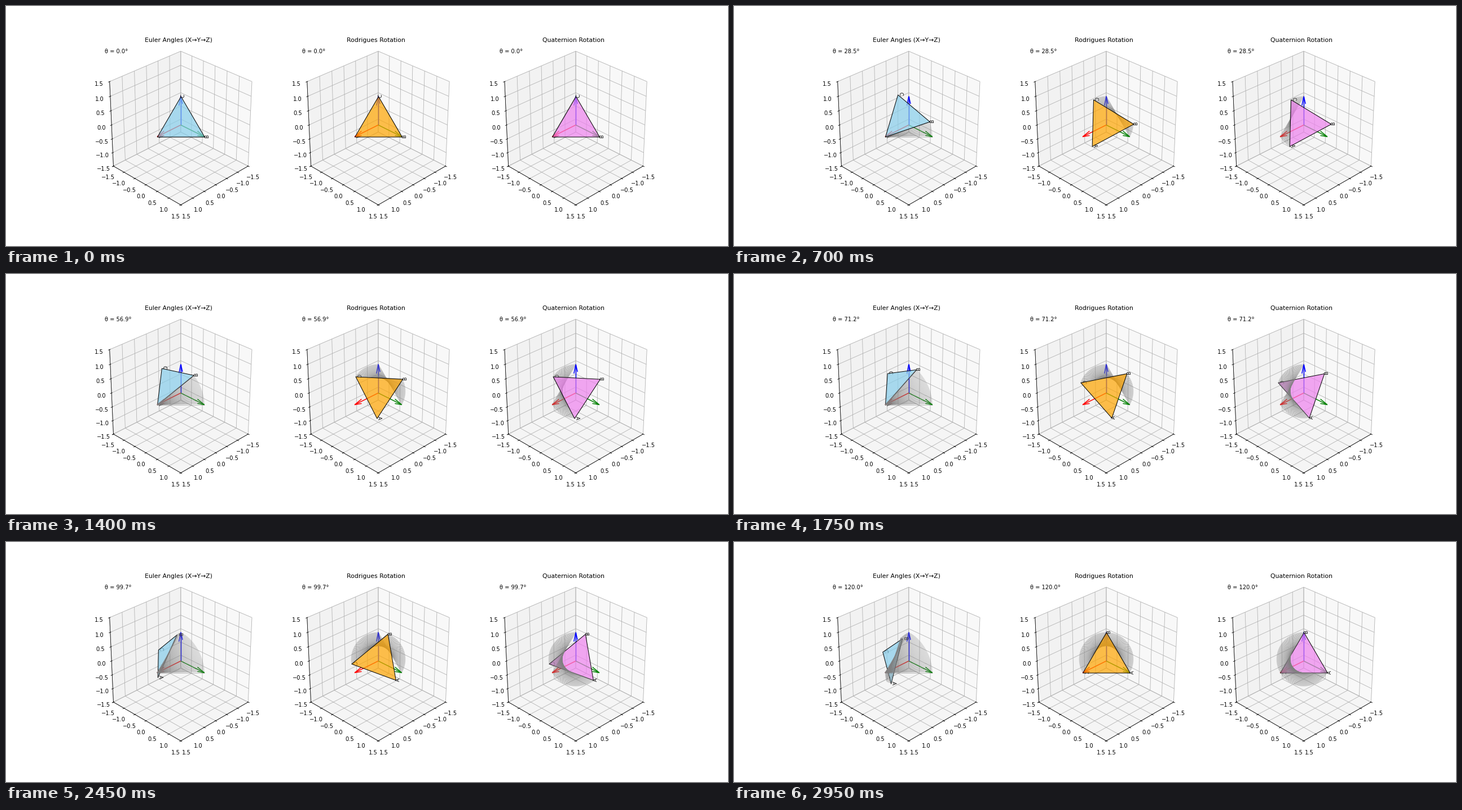
Recreate the animation shown at these times as a matplotlib script. Size 1280 px wide and 427 px high, loop 3000 ms.

```python
import numpy as np
import matplotlib.pyplot as plt
from matplotlib.animation import FuncAnimation
from mpl_toolkits.mplot3d.art3d import Line3DCollection, Poly3DCollection

plt.rcParams["font.family"] = "DejaVu Sans"

FRAMES, INTERVAL = 60, 50
ANGLES = np.linspace(0, 120, FRAMES)
TRIANGLE = np.eye(3)  # rows are the vertices A, B, C
DPI = 1280 / 18
# Shrinking coplanar parts slightly keeps the depth order arrows < trail < face.
ARROW_SCALE, TRAIL_SCALE = 0.9998, 0.9999


def axis_rotation(axis, degrees):
    """Rotation matrix about an axis by Rodrigues' formula."""
    x, y, z = np.asarray(axis, float) / np.linalg.norm(axis)
    k = np.array([[0, -z, y], [z, 0, -x], [-y, x, 0]])
    a = np.radians(degrees)
    return np.eye(3) + np.sin(a) * k + (1 - np.cos(a)) * k @ k


def euler_rotation(theta):
    """Turn about X up to 90 degrees, then Y for 20, then Z for 10."""
    rx = axis_rotation((1, 0, 0), min(theta, 90))
    ry = axis_rotation((0, 1, 0), np.clip(theta - 90, 0, 20))
    rz = axis_rotation((0, 0, 1), np.clip(theta - 110, 0, 10))
    return rz @ ry @ rx


def diagonal_rotation(theta):
    return axis_rotation((1, 1, 1), theta)


class Panel:
    def __init__(self, ax, title, rotation, color, edge):
        self.poses = [TRIANGLE @ rotation(t).T for t in ANGLES]
        self.edges = [pose[list(edge)] * TRAIL_SCALE for pose in self.poses]

        for direction, arrow_color in zip(np.eye(3), ("red", "green", "blue")):
            ax.quiver(0, 0, 0, *direction * ARROW_SCALE, color=arrow_color)
        self.trail = Line3DCollection(self.edges[:1], colors="gray",
                                      linewidths=1, alpha=0.5)
        ax.add_collection3d(self.trail)
        self.face = Poly3DCollection([TRIANGLE], facecolors=color,
                                     edgecolors="black", linewidths=1, alpha=0.7)
        ax.add_collection3d(self.face)
        self.labels = [ax.text(*point, name, zdir="z", fontsize=9)
                       for point, name in zip(TRIANGLE, "ABC")]
        self.readout = ax.text2D(0.05, 0.95, "", transform=ax.transAxes, fontsize=10)

        ax.set_title(title, fontsize=11)
        ax.set(xlim=(-1.5, 1.5), ylim=(-1.5, 1.5), zlim=(-1.5, 1.5))
        ax.set_box_aspect((1, 1, 1))
        ax.view_init(elev=30, azim=45)

    def show(self, frame):
        pose = self.poses[frame]
        self.face.set_verts([pose])
        self.trail.set_segments(self.edges[:frame + 1])
        for label, point in zip(self.labels, pose):
            label.set_position_3d(point)
        self.readout.set_text(f"θ = {ANGLES[frame]:.1f}°")


fig = plt.figure(figsize=((1280 + 1e-6) / DPI, (427 + 1e-6) / DPI), dpi=DPI)
A, B, C = range(3)
SETUPS = [
    ("Euler Angles (X→Y→Z)", euler_rotation, "skyblue", (A, B)),
    ("Rodrigues Rotation", diagonal_rotation, "orange", (B, C)),
    ("Quaternion Rotation", diagonal_rotation, "violet", (C, A)),
]
panels = [Panel(fig.add_subplot(1, 3, i, projection="3d"), *setup)
          for i, setup in enumerate(SETUPS, start=1)]


def update(frame):
    for panel in panels:
        panel.show(frame)
    return []


anim = FuncAnimation(fig, update, frames=FRAMES, interval=INTERVAL,
                     repeat=True, repeat_delay=0, blit=False)
plt.show()
```
